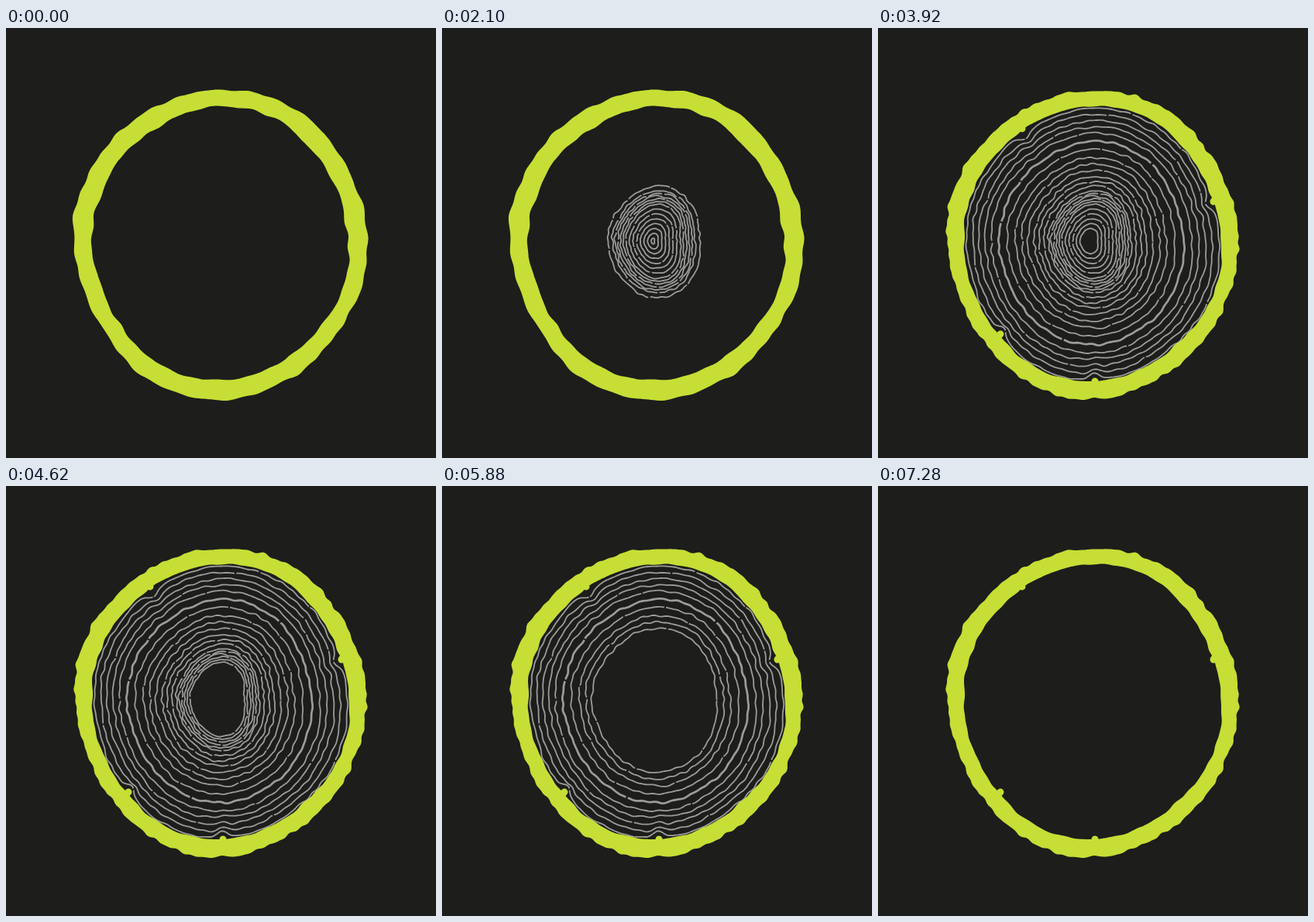
These frames come from a looping animation (555 by 555 pixels, 7420 ms). An HTML page:

```html
<!DOCTYPE html>
<html lang="en">
<head>
<meta charset="utf-8">
<title>Tree rings</title>
<style>
  html, body { margin: 0; width: 100%; height: 100%; overflow: hidden; background: #1d1d1b; }
  svg { display: block; width: 100%; height: 100%; }
  .bark path { fill: #c6de35; fill-rule: evenodd; }
  .bark line { stroke: #c6de35; stroke-width: 9; stroke-linecap: round; }
  .rings path { fill: none; stroke: #9c9c9a; stroke-width: 1.8; stroke-linejoin: round; }
</style>
</head>
<body>
<svg id="stage" viewBox="0 0 555 555"></svg>
<script>
const STEP = 140, FRAMES = 53, RING_COUNT = 26, THICK_RING = 21;
const TAU = Math.PI * 2, RIGHT_ANGLE = TAU / 4;
const BARK = { x: 277, y: 278 }, PITH = { x: 272, y: 275 };
const { cos, sin, min, max } = Math;
const stage = document.getElementById('stage');

// Bark spurs that press into the outer rings: tip, then offset to the root.
const SPURS = [
  { x: 186, y: 130, dx: -8, dy: -9 },
  { x: 433, y: 224, dx: 8, dy: -11 },
  { x: 158, y: 395, dx: -9, dy: 10 },
  { x: 280, y: 456, dx: 0, dy: 7 }
];

// Half widths of a few rings; the rest lie evenly between.
const WIDTHS = [[1, 2], [8, 35], [13, 53], [16, 72], [19, 97], [22, 129], [RING_COUNT, 162]];

function random(seed) {
  let state = seed * 7919 + 17;
  const next = () => {
    state = (state * 16807 + 11) % 2147483647;
    return state / 2147483647;
  };
  next();
  return next;
}

// Uneven edge: a sum of sines, weaker as they get finer.
function wobble(seed, size, finest) {
  const rnd = random(seed);
  const waves = Array.from({ length: 14 }, (_, i) => ({
    count: Math.round(5 + (finest - 5) * (i + rnd()) / 14),
    phase: rnd() * TAU,
    height: size / Math.sqrt(1 + i / 2)
  }));
  return a => waves.reduce((sum, w) => sum + w.height * sin(a * w.count + w.phase), 0);
}

const tall = a => -cos(2 * a);
const boxy = a => 2 * cos(4 * a - 0.96);

function loopPath(centre, radius, count = 360) {
  const points = Array.from({ length: count }, (_, i) => {
    const a = i / count * TAU, r = radius(a);
    return (centre.x + r * cos(a)).toFixed(1) + ' ' + (centre.y + r * sin(a)).toFixed(1);
  });
  return 'M' + points.join('L') + 'Z';
}

function add(parent, tag, attrs) {
  const node = document.createElementNS('http://www.w3.org/2000/svg', tag);
  for (const key in attrs) node.setAttribute(key, attrs[key]);
  return parent.appendChild(node);
}

function bark(outer, inner, outerNoise, innerNoise) {
  const group = add(stage, 'g', { class: 'bark' });
  const shape = (base, a) => base + 5.6 * tall(a) + boxy(a);
  const outside = loopPath(BARK, a => shape(outer, a) - 1.75 * sin(3 * a) + outerNoise(a));
  const inside = loopPath(BARK, a => shape(inner, a) + innerNoise(a));
  add(group, 'path', { d: outside + inside });
  return group;
}

function halfWidth(index) {
  const k = max(1, WIDTHS.findIndex(([at]) => at >= index));
  const [from, a] = WIDTHS[k - 1], [to, b] = WIDTHS[k];
  return a + (b - a) * (index - from) / (to - from);
}

function dent(a, index, centre) {
  const depth = 8 * Math.pow(0.62, RING_COUNT - index);
  return SPURS.reduce((sum, s) => {
    const at = Math.atan2(s.y - centre.y, s.x - centre.x);
    return sum + depth * Math.exp((cos(a - at) - 1) * 600);
  }, 0);
}

// Long strokes with a few short breaks.
function dashes(seed, length) {
  const rnd = random(seed);
  const parts = Array.from({ length: 5 }, () => [length * (0.05 + rnd() * 0.3), 1.5 + rnd() * 1.5]);
  return parts.flat().map(v => v.toFixed(1)).join(' ');
}

// Rings start near the pith, lopsided, and settle into the bark's shape.
function growthRing(parent, index) {
  const age = (index / RING_COUNT) ** 2;
  const centre = { x: PITH.x + 5.5 * age, y: PITH.y + 4 * age };
  const stretch = 6 * min(1, index / 8);
  const lean = min(3, index * 0.35) * (1 - age);
  const base = halfWidth(index) + stretch;
  const noise = wobble(index + 40, min(0.45, index * 0.03), 12 + index * 2);
  const radius = a => base + stretch * tall(a) + lean * (cos(a) - cos(3 * a))
    + age * boxy(a) + noise(a) - dent(a, index, centre);
  const path = add(parent, 'path', { d: loopPath(centre, radius) });
  if (index > 4) path.setAttribute('stroke-dasharray', dashes(index, base * TAU));
  if (index === THICK_RING) path.style.strokeWidth = 2.7;
  return path;
}

const ringLayer = add(stage, 'g', { class: 'rings' });
const rings = Array.from({ length: RING_COUNT }, (_, i) => growthRing(ringLayer, i + 1));

const outerLumps = wobble(3, 0.6, 45), innerLumps = wobble(4, 0.6, 40);
const smooth = bark(193.8, 170, outerLumps, innerLumps);
const swollen = bark(196.3, 168.5, outerLumps, innerLumps);
const rough = bark(192.5, 171, wobble(8, 0.65, 85), wobble(9, 0.4, 50));
SPURS.forEach(s => add(rough, 'line', { x1: s.x, y1: s.y, x2: s.x + s.dx, y2: s.y + s.dy }));

const barkCycle = [smooth, swollen, rough, rough, rough];

function show(node, visible) {
  node.style.display = visible ? '' : 'none';
}

function render(time) {
  const frame = Math.floor(time / STEP) % FRAMES;
  const current = barkCycle[frame % barkCycle.length];
  [smooth, swollen, rough].forEach(layer => show(layer, layer === current));
  rings.forEach((ring, i) => show(ring, i + 1 < frame && i + 1 > frame - RING_COUNT));
}

const start = performance.now();
function tick() {
  render(performance.now() - start);
  requestAnimationFrame(tick);
}
tick();
</script>
</body>
</html>
```
